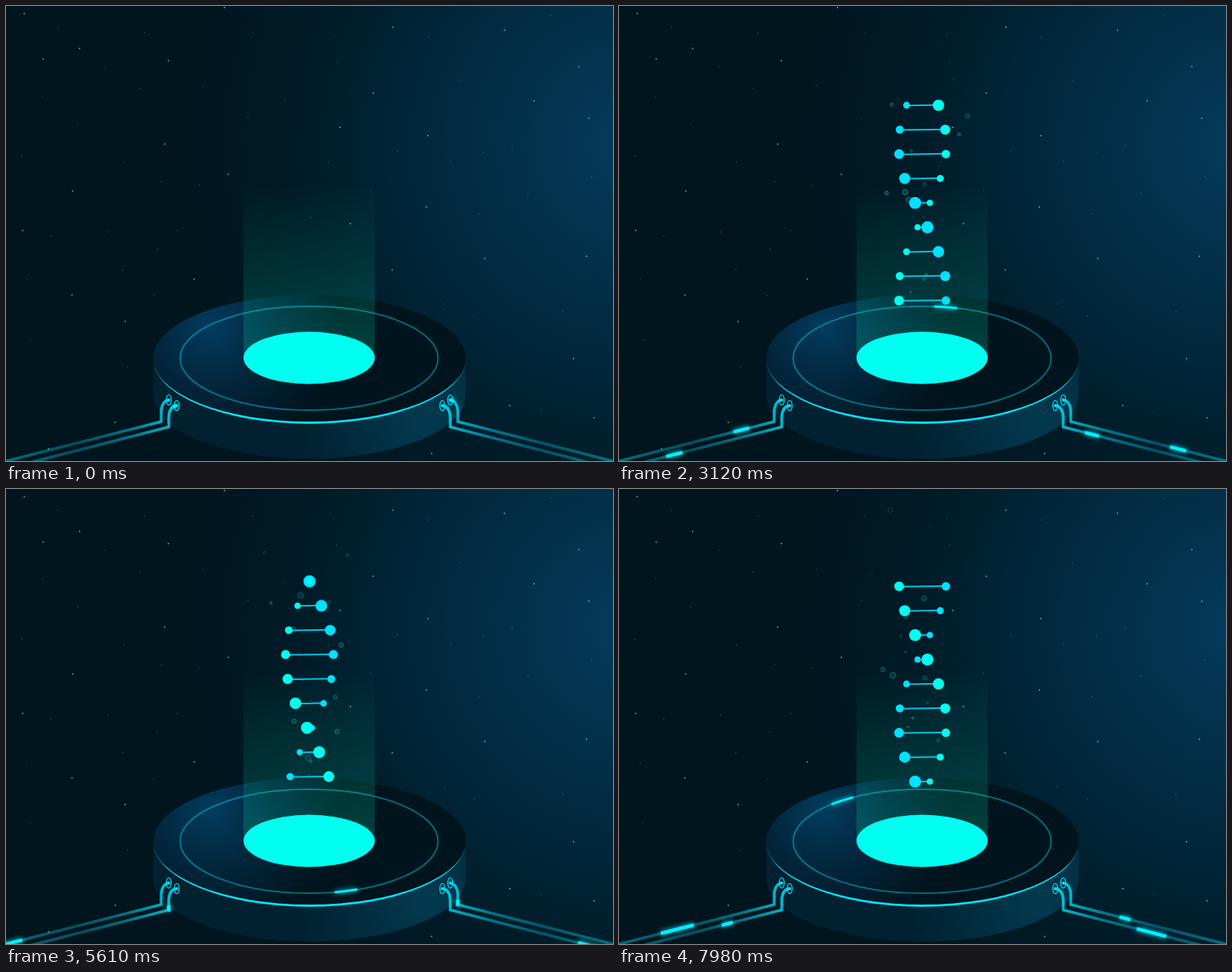
These frames come from a looping animation (800 by 600 pixels, 8000 ms). An HTML page:

```html
<!DOCTYPE html>
<html lang="en">
<head>
<meta charset="utf-8">
<title>Helix platform</title>
<style>
  html, body { margin: 0; width: 100%; height: 100%; overflow: hidden; background: #00141d; }
  svg { display: block; width: 800px; height: 600px; }
</style>
</head>
<body>
<svg id="stage" viewBox="0 0 800 600" fill="none">
  <defs>
    <radialGradient id="sky" gradientUnits="userSpaceOnUse" cx="830" cy="182" r="600">
      <stop offset="0" stop-color="#043c5e"/>
      <stop offset=".4" stop-color="#022b41"/>
      <stop offset=".72" stop-color="#001c29"/>
      <stop offset="1" stop-color="#00151e"/>
    </radialGradient>
    <radialGradient id="top" gradientUnits="userSpaceOnUse" cx="272" cy="424" r="165">
      <stop offset="0" stop-color="#033c5e"/>
      <stop offset=".5" stop-color="#022439"/>
      <stop offset="1" stop-color="#00141d"/>
    </radialGradient>
    <radialGradient id="side" gradientUnits="userSpaceOnUse" cx="555" cy="545" r="170">
      <stop offset="0" stop-color="#033a50"/>
      <stop offset="1" stop-color="#012130"/>
    </radialGradient>
    <linearGradient id="column" x1="0" y1="0" x2="0" y2="1">
      <stop offset="0" stop-color="#00ffc8" stop-opacity="0"/>
      <stop offset="1" stop-color="#00ffc8" stop-opacity=".2"/>
    </linearGradient>
    <linearGradient id="wire" gradientUnits="userSpaceOnUse" x1="222" y1="525" x2="0" y2="600">
      <stop offset="0" stop-color="#00e5ff" stop-opacity=".85"/>
      <stop offset=".3" stop-color="#00e5ff" stop-opacity=".45"/>
      <stop offset=".6" stop-color="#00e5ff" stop-opacity=".28"/>
      <stop offset="1" stop-color="#00e5ff" stop-opacity=".42"/>
    </linearGradient>
    <filter id="glow" filterUnits="userSpaceOnUse" x="-120" y="370" width="1040" height="300">
      <feGaussianBlur stdDeviation="3" result="b"/>
      <feMerge><feMergeNode in="b"/><feMergeNode in="SourceGraphic"/></feMerge>
    </filter>
    <clipPath id="air"><rect y="10" width="800" height="590"/></clipPath>
    <path id="upper" d="M214.5 519.5C207 521 204.5 528 204.5 537V548L-130 633.3"/>
    <path id="lower" d="M224.5 527C217 528 214.5 535 214.5 544V555L-120 641"/>
    <g id="wires">
      <g stroke="url(#wire)" stroke-width="3.8">
        <use href="#upper"/><use href="#lower"/>
      </g>
      <g stroke="#00e5ff" stroke-width="1.3">
        <ellipse cx="214.5" cy="519.5" rx="3.2" ry="6.6"/>
        <ellipse cx="225" cy="527" rx="3.2" ry="6.6"/>
      </g>
      <g fill="#00e5ff"><circle cx="214.5" cy="519.5" r="1.9"/><circle cx="225" cy="527" r="1.9"/></g>
    </g>
  </defs>

  <rect width="800" height="600" fill="url(#sky)"/>
  <g id="stars" fill="#2fd9e6"></g>

  <path d="M194 465V513A206 84 0 0 0 606 513V465Z" fill="url(#side)"/>
  <ellipse cx="400" cy="465" rx="206" ry="84" fill="url(#top)"/>
  <path d="M194 465A206 86 0 0 0 606 465A206 83 0 0 1 194 465Z" fill="#00e5ff"/>
  <ellipse cx="399.5" cy="464.5" rx="170" ry="68.5" stroke="#00e5ff" stroke-opacity=".42" stroke-width="2"/>
  <path d="M313 235H486V464H313Z" fill="url(#column)"/>
  <ellipse cx="399.5" cy="464" rx="86.5" ry="34.5" fill="#00fff0"/>

  <use href="#wires"/>
  <use href="#wires" transform="translate(800) scale(-1 1)"/>

  <g filter="url(#glow)" stroke="#00f0ff">
    <path id="spark" stroke-width="3" d="M229.5 464.5a170 68.5 0 0 0 340 0a170 68.5 0 0 0 -340 0"/>
    <g id="pulses" stroke-width="4.6"></g>
  </g>

  <g id="bubbles" clip-path="url(#air)" stroke="#00e5d8" fill="#00e5d8" fill-opacity=".22"></g>
  <g id="helix"></g>
</svg>
<script>
const LOOP = 8000, STEP = 30, TURN = 1800, ROWS = 9;
const $ = id => document.getElementById(id);

function add(parent, tag, attrs = {}) {
  const el = document.createElementNS('http://www.w3.org/2000/svg', tag);
  set(el, attrs);
  return parent.appendChild(el);
}
function set(el, attrs) {
  for (const k in attrs) el.setAttribute(k, attrs[k]);
}
const mix = (a, b, p) => a + (b - a) * p;

let seed = 29;
function rand(a = 0, b = 1) {
  seed = (seed * 16807) % 2147483647;
  return mix(a, b, seed / 2147483647);
}

// Stars
const bright = [24,10, 288,2, 510,28, 657,32, 49,70, 97,56, 214,72, 755,80, 484,115, 696,125, 768,148,
  440,160, 556,171, 209,182, 293,222, 88,244, 554,265, 454,287, 22,296, 765,330, 631,333, 509,348,
  248,360, 87,381, 157,416, 748,465, 664,527, 144,549, 775,543, 56,584, 561,590];
const faint = [69,28, 183,35, 325,35, 432,38, 557,41, 718,12, 131,80, 436,74, 598,98, 260,105, 177,109,
  48,119, 368,123, 319,147, 95,156, 516,192, 586,205, 629,193, 667,184, 772,225, 21,198, 155,206,
  205,232, 255,236, 425,206, 480,243, 688,247, 623,274, 59,303, 134,298, 226,296, 402,279, 199,320,
  154,348, 28,361, 195,382, 578,393, 617,409, 734,403, 32,441, 160,476, 705,534];
function drawStars(list, r, opacity) {
  for (let i = 0; i < list.length; i += 2)
    add($('stars'), 'circle', { cx: list[i], cy: list[i + 1], r, opacity });
}
drawStars(bright, .9, .9);
drawStars(faint, .7, .42);

// Light pulses: distances from the node as [from, to] for both ends
const flip = 'translate(800) scale(-1 1)';
const pulses = [
  { id: 'upper', a: [251, 0], b: [330, 0] },
  { id: 'lower', a: [234, 0], b: [305, 0], flip },
  { id: 'lower', a: [0, 229], b: [4.8, 257] },
  { id: 'upper', a: [0, 229], b: [4.8, 257], flip }
].map(p => {
  const el = add($('pulses'), 'path', { d: $(p.id).getAttribute('d') });
  if (p.flip) set(el, { transform: p.flip });
  return { ...p, el };
});
function drawPulses(t) {
  const p = (t % TURN) / TURN;
  for (const { a, b, el } of pulses) {
    const from = mix(...a, p), to = mix(...b, p);
    set(el, { 'stroke-dasharray': `0 ${from} ${to - from} 2000` });
  }
}

const spark = $('spark'), round = spark.getTotalLength();
function drawSpark(t) {
  const head = .1896 * (t - 107), len = Math.min(30, Math.max(0, head));
  set(spark, {
    'stroke-dasharray': `${len} ${round - len}`,
    'stroke-dashoffset': len - head,
    visibility: len ? 'visible' : 'hidden'
  });
}

// Helix
const rows = Array.from({ length: ROWS }, (_, k) => {
  const g = add($('helix'), 'g');
  return {
    g, k, start: 2460 - 150 * k,
    bar: add(g, 'line', { stroke: '#00c8e6', 'stroke-width': 2 }),
    blue: add(g, 'circle', { fill: '#00e1ff' }),
    green: add(g, 'circle', { fill: '#00ffee' })
  };
});
function bob(t) {
  if (t < 2581) return 0;
  const u = ((t - 2581) / 1455) % 2;
  return 31.5 * (u < 1 ? u : 2 - u);
}
// Later turns hold their last pose for one step
function angle(s) {
  const u = s < TURN ? s : Math.min(TURN, (s - TURN) % (TURN + STEP));
  return u / TURN * 2 * Math.PI - Math.PI / 2;
}
function drawRow({ g, k, start, bar, blue, green }, t) {
  const s = t - start, open = s / 450 + 1;
  set(g, { visibility: open > -.5 ? 'visible' : 'hidden' });
  if (open <= -.5) return;
  let y = 119.2 + 32.19 * k + bob(t), x, rg, rb;
  if (s < 0) {
    const q = Math.max(0, open);
    x = -31.5 * q;
    y += 9.3 * (1 - q);
    rg = rb = open < 0 ? 8 * (1 + open * 2) : 8 - 2 * q;
  } else {
    const a = angle(s);
    x = 31.5 * Math.sin(a);
    rg = 6 + 2 * Math.cos(a);
    rb = 12 - rg;
  }
  const tilt = x < 0 ? .4 : -.4;
  set(bar, { x1: 400 + x, x2: 400 - x, y1: y + tilt, y2: y - tilt });
  set(green, { cx: 400 + x, cy: y, r: rg });
  set(blue, { cx: 400 - x, cy: y, r: rb });
}

// Bubbles rise from the base and drift outwards
const bubbles = Array.from({ length: 56 }, (_, i) => ({
  el: add($('bubbles'), 'circle'),
  born: 720 + i * 132,
  life: rand(1300, 2600),
  x0: rand(375, 425), x1: rand(310, 490),
  y1: rand(-20, 130), r: rand(1, 3.8), o: rand(.3, .6)
}));
function drawBubble(b, t) {
  const p = (t - b.born) / b.life, on = p > 0 && p < 1;
  set(b.el, { visibility: on ? 'visible' : 'hidden' });
  if (!on) return;
  set(b.el, {
    cx: mix(b.x0, b.x1, p), cy: mix(408, b.y1, p),
    r: b.r * Math.min(1, p * 6),
    opacity: b.o * Math.min(1, p * 8, (1 - p) * 4)
  });
}

function draw(t) {
  drawSpark(t);
  drawPulses(t);
  rows.forEach(r => drawRow(r, t));
  bubbles.forEach(b => drawBubble(b, t));
}

const begin = performance.now();
function tick() {
  const t = (performance.now() - begin) % LOOP;
  draw(Math.floor(t / STEP) * STEP);
  requestAnimationFrame(tick);
}
draw(0);
requestAnimationFrame(tick);
</script>
</body>
</html>
```
